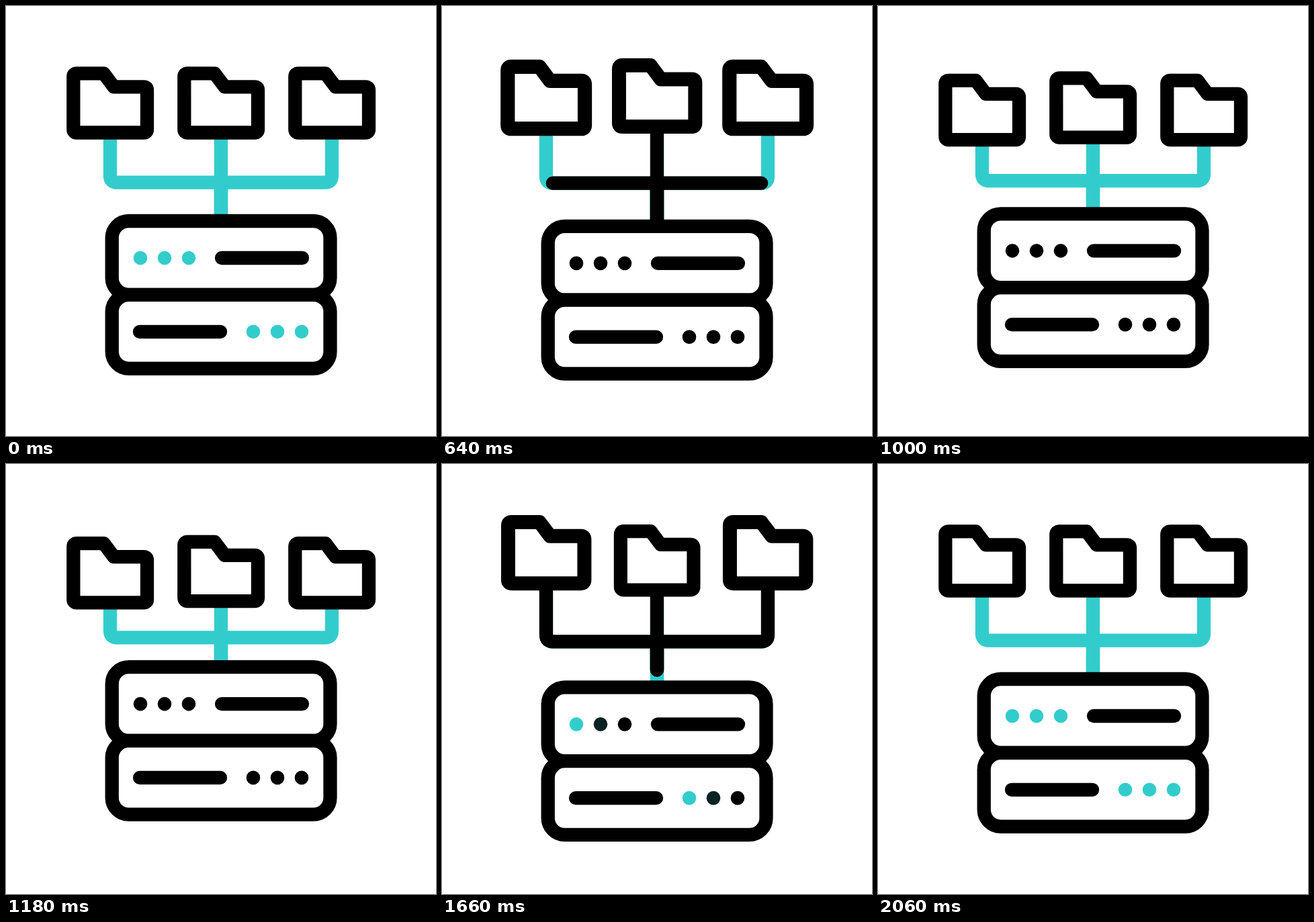
Write an HTML page with a canvas that moves like this. It is 640x640 px and loops after 2.3 s.

```html
<!DOCTYPE html>
<html lang="en">
<head>
<meta charset="utf-8">
<title>Server and folders</title>
<style>
html, body { margin: 0; width: 100%; height: 100%; overflow: hidden; background: #fff; }
canvas { display: block; width: 100vmin; height: 100vmin; }
</style>
</head>
<body>
<canvas id="stage" width="640" height="640"></canvas>
<script>
const ctx = document.getElementById('stage').getContext('2d');
const LOOP = 2300, STEP = 20, MID_DELAY = 70;
const TEAL = '#33cccc', BLACK = '#000', WHITE = '#fff';
const FOLDER_Y = 144.3;

// [time, value] pairs
const BOUNCE = [[220, 0], [400, 13.5], [1320, -20], [1460, -20], [1685, 13.5], [1990, 0]];
const SCALE = [
  [220, 1], [300, .97], [400, .97], [565, 1.03], [605, 1.06], [640, 1.046], [750, 1.016], [820, 1],
  [1490, 1], [1545, .97], [1590, .99], [1660, 1.034], [1730, 1.06], [1830, 1.02], [1900, 1]
];

const span = (t, a, b) => Math.min(1, Math.max(0, (t - a) / (b - a)));
const smooth = p => p * p * (3 - 2 * p);
const linear = p => p;

function track(keys, t, ease) {
  let value = keys[0][1];
  for (let i = 1; i < keys.length; i++) {
    value += (keys[i][1] - keys[i - 1][1]) * ease(span(t, keys[i - 1][0], keys[i][0]));
  }
  return value;
}

// Outline around the folder's own centre
const folder = new Path2D(`M-49.7 -44 H-9.5 L5.5 -24 H50 q5 0 5 5 V39.2 q0 5 -5 5
  H-49.7 q-5 0 -5 -5 V-39 q0 -5 5 -5 Z`);

function drawFolder(x, t) {
  const s = track(SCALE, t, linear);
  ctx.save();
  ctx.translate(x, FOLDER_Y - track(BOUNCE, t, smooth));
  ctx.scale(s, s);
  ctx.fillStyle = WHITE;
  ctx.fill(folder);
  ctx.strokeStyle = BLACK;
  ctx.lineWidth = 20.3;
  ctx.stroke(folder);
  ctx.restore();
}

function stroke(path, color, cap) {
  ctx.strokeStyle = color;
  ctx.lineCap = cap;
  ctx.lineWidth = 20.3;
  ctx.stroke(path);
}

// Black part of a wire, from and to as shares of its length
function drawPulse(path, length, [from, to]) {
  if (to <= from) return;
  ctx.setLineDash([(to - from) * length, length * 2]);
  ctx.lineDashOffset = -from * length;
  stroke(path, BLACK, 'round');
  ctx.setLineDash([]);
}

function drawWires(t, dy) {
  const top = 188 - dy, bottom = 320 + dy;
  const midTop = 188 - track(BOUNCE, t - MID_DELAY, smooth);
  const y = 262.6 + dy * (dy < 0 ? .24 : .14);
  const sides = [155, 485].map(x => {
    const turn = x < 320 ? 10 : -10;
    return new Path2D(`M${x} ${top} V${y - 10} Q${x} ${y} ${x + turn} ${y} H320 V${bottom}`);
  });
  const mid = new Path2D(`M320 ${midTop} V${bottom}`);
  [...sides, mid].forEach(p => stroke(p, TEAL, 'butt'));

  const down = t < 1140;
  const sidePulse = down
    ? [span(t, 562, 831), span(t, 247, 516)]
    : [1 - span(t, 1380, 1640), 1 - span(t, 1638, 1907)];
  const midPulse = down
    ? [span(t, 642, 831), span(t, 262, 516)]
    : [1 - span(t, 1380, 1650), 1 - span(t, 1610, 1890)];
  const sideLength = bottom - top + 165 - 3.8;
  sides.forEach(p => drawPulse(p, sideLength, sidePulse));
  drawPulse(mid, bottom - midTop, midPulse);
}

function drawUnit(y, barX, dotX, t) {
  const box = new Path2D();
  box.roundRect(157.7, y, 324.8, 109.8, 25);
  ctx.fillStyle = WHITE;
  ctx.fill(box);
  stroke(box, BLACK, 'butt');
  stroke(new Path2D(`M${barX} ${y + 55} h120`), BLACK, 'round');
  for (let i = 0; i < 3; i++) {
    const lit = 1 - span(t, 480 + i * 50, 540 + i * 50) + span(t, 1590 + i * 60, 1650 + i * 60);
    ctx.fillStyle = `rgb(${51 * lit}, ${204 * lit}, ${204 * lit})`;
    ctx.beginPath();
    ctx.arc(dotX + i * 36, y + 55, 10.3, 0, 7);
    ctx.fill();
  }
}

function draw(now) {
  const t = Math.floor(now % LOOP / STEP) * STEP;
  const dy = track(BOUNCE, t, smooth);
  ctx.fillStyle = WHITE;
  ctx.fillRect(0, 0, 640, 640);
  ctx.lineJoin = 'round';
  drawWires(t, dy);
  drawFolder(155, t);
  drawFolder(320, t - MID_DELAY);
  drawFolder(485, t);
  drawUnit(320 + dy, 321, 200, t);
  drawUnit(429.8 + dy, 199, 368, t);
}

let start;
function tick(now) {
  start ??= now;
  draw(now - start);
  requestAnimationFrame(tick);
}
requestAnimationFrame(tick);
</script>
</body>
</html>
```
